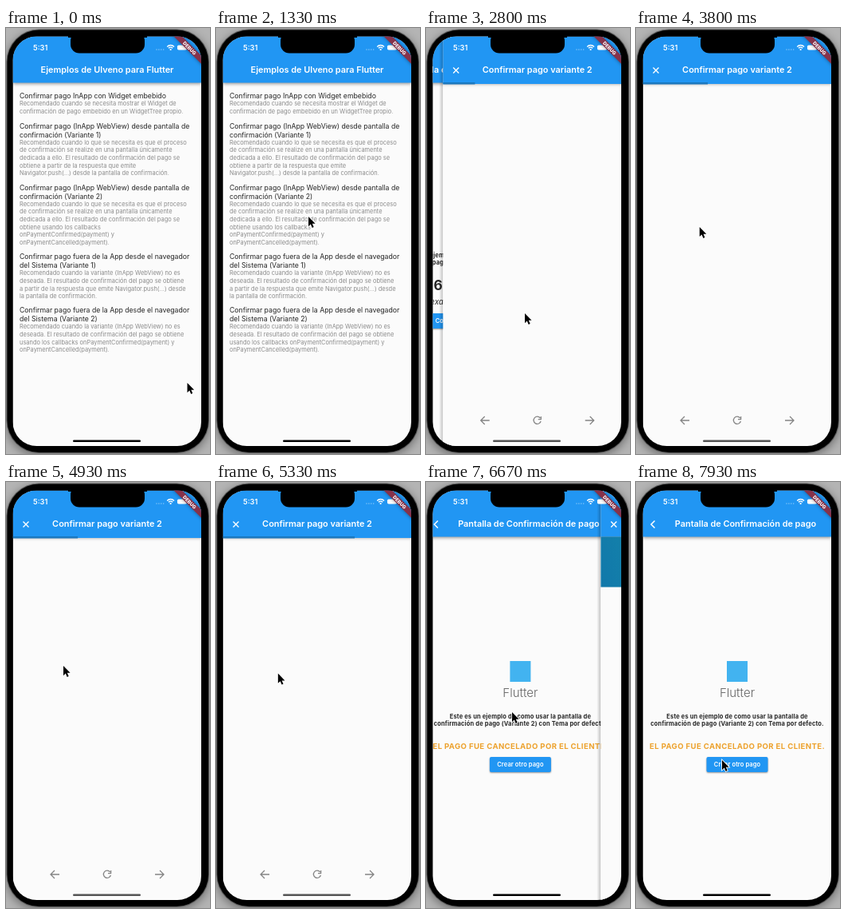
An HTML page with a canvas for the animation above (8 s loop, 256 by 533 pixels).

```html
<!DOCTYPE html>
<html lang="es">
<head>
<meta charset="utf-8">
<style>
html, body { margin: 0; width: 100%; height: 100%; overflow: hidden; background: #b4b4b4; }
canvas { display: block; width: 256px; height: 533px; }
</style>
</head>
<body>
<canvas id="stage"></canvas>
<script>
const LOOP = 8000, LEFT = 8.5, TOP = 10.5, WIDTH = 236.5, HEIGHT = 512.5, MID = 127, BAR_BOTTOM = 68.5;
const BLUE = '#2196f3', PAGE = '#fbfbfb', INK = '#262626', MUTED = '#8b8b8b';
const canvas = document.getElementById('stage');
const dpr = window.devicePixelRatio || 1;
canvas.width = 256 * dpr;
canvas.height = 533 * dpr;
const ctx = canvas.getContext('2d');

const clamp = v => Math.max(0, Math.min(1, v));
const smooth = v => v * v * (3 - 2 * v);

// Page slide: cubic-bezier(.35, .91, .33, .97)
function slideEase(x) {
  if (x <= 0 || x >= 1) return x;
  const curve = (s, a, b) => 3 * (1 - s) * (1 - s) * s * a + 3 * (1 - s) * s * s * b + s * s * s;
  let lo = 0, hi = 1;
  for (let i = 0; i < 20; i++) {
    const s = (lo + hi) / 2;
    if (curve(s, .35, .33) < x) lo = s; else hi = s;
  }
  return curve(lo, .91, .97);
}
const slide = (t, start) => slideEase(clamp((t - start) / 400));

function text(str, x, y, size, { color = INK, weight = 400, spacing = 0, align = 'left', style = 'normal' } = {}) {
  ctx.font = `${style} ${weight} ${size}px Inter, sans-serif`;
  ctx.letterSpacing = spacing + 'px';
  ctx.textAlign = align;
  ctx.fillStyle = color;
  ctx.fillText(str, x, y);
}

function box(x, y, w, h, color, radius = 0) {
  ctx.fillStyle = color;
  ctx.beginPath();
  ctx.roundRect(x, y, w, h, radius);
  ctx.fill();
}

function dot(x, y, r, color) {
  ctx.fillStyle = color;
  ctx.beginPath();
  ctx.arc(x, y, r, 0, 7);
  ctx.fill();
}

function line(path, color, width) {
  ctx.strokeStyle = color;
  ctx.lineWidth = width;
  ctx.stroke(new Path2D(path));
}

function withShadow(blur, dy, draw) {
  ctx.save();
  ctx.shadowColor = 'rgba(0,0,0,.4)';
  ctx.shadowBlur = blur * dpr;
  ctx.shadowOffsetY = dy * dpr;
  draw();
  ctx.restore();
}

function page(title, titleX = MID) {
  box(LEFT, TOP, WIDTH, HEIGHT, PAGE);
  withShadow(4, 1.4, () => box(LEFT, TOP, WIDTH, BAR_BOTTOM - TOP, BLUE));
  text(title, titleX, 56.4, 10.9, { color: '#fff', weight: 600, align: 'center' });
}

function raisedButton(label, y, w) {
  withShadow(2, 1, () => box(MID - w / 2, y, w, 19, BLUE, 2));
  text(label, MID, y + 12.2, 7.5, { color: '#fff', weight: 600, spacing: .1, align: 'center' });
}

const EXAMPLES = [
  [88, 'Confirmar pago InApp con Widget embebido',
    'Recomendado cuando se necesita mostrar el Widget de|confirmación de pago embebido en un WidgetTree propio.'],
  [125.5, 'Confirmar pago (InApp WebView) desde pantalla de|confirmación (Variante 1)',
    'Recomendado cuando lo que se necesita es que el proceso|de confirmación se realize en una pantalla únicamente|dedicada a ello. El resultado de confirmación del pago se|obtiene a partir de la respuesta que emite|Navigator.push(...) desde la pantalla de confirmación.'],
  [202.5, 'Confirmar pago (InApp WebView) desde pantalla de|confirmación (Variante 2)',
    'Recomendado cuando lo que se necesita es que el proceso|de confirmación se realize en una pantalla únicamente|dedicada a ello. El resultado de confirmación del pago se|obtiene usando los callbacks|onPaymentConfirmed(payment) y|onPaymentCancelled(payment).'],
  [289, 'Confirmar pago fuera de la App desde el navegador|del Sistema (Variante 1)',
    'Recomendado cuando la variante (InApp WebView) no es|deseada. El resultado de confirmación del pago se obtiene|a partir de la respuesta que emite Navigator.push(...) desde|la pantalla de confirmación.'],
  [356, 'Confirmar pago fuera de la App desde el navegador|del Sistema (Variante 2)',
    'Recomendado cuando la variante (InApp WebView) no es|deseada. El resultado de confirmación del pago se obtiene|usando los callbacks onPaymentConfirmed(payment) y|onPaymentCancelled(payment).']
];

function listPage() {
  page('Ejemplos de Ulveno para Flutter');
  for (const [top, title, body] of EXAMPLES) {
    const heads = title.split('|');
    heads.forEach((s, i) => text(s, 17, top + i * 11, 8.7));
    const y = top + (heads.length - 1) * 11 + 9.3;
    body.split('|').forEach((s, i) => text(s, 17, y + i * 9.6, 7.45, { color: MUTED }));
  }
}

function paymentPage(cancelled) {
  page('Pantalla de Confirmación de pago', 137.5);
  line('M23.5 48.5L19 53L23.5 57.5', '#fff', 1.5);
  const dy = cancelled ? 9 : 0;
  box(114, 215 + dy, 26, 26, '#42b3f0');
  text('Flutter', MID, 260 + dy, 15, { color: '#666', weight: 300, align: 'center' });
  const bold = { weight: 700, spacing: .16, align: 'center' };
  text('Este es un ejemplo de como usar la pantalla de', MID, 286.5 + dy, 7.5, bold);
  text('confirmación de pago (Variante 2) con Tema por defecto.', MID, 296 + dy, 7.5, bold);
  if (cancelled) {
    text('EL PAGO FUE CANCELADO POR EL CLIENTE.', MID, 333.5, 9.6, { ...bold, spacing: .37, color: '#eda22d' });
    raisedButton('Crear otro pago', 344, 77);
  } else {
    text('62.00', 84, 328, 17.4, { weight: 700, spacing: .3 });
    text('CUP', 142, 328, 13);
    text('This is an example payment description', 125, 346, 9.5, { align: 'center', style: 'italic', spacing: .16 });
    raisedButton('Confirmar pago ahora', 357, 99);
  }
}

function navIcons(color) {
  line('M67 491H56M61 486L56 491L61 496', color, 1.3);
  line('M187 491H198M193 486L198 491L193 496', color, 1.3);
  line('M130.6 488A4.6 4.6 0 1 0 131.4 492M131.6 486V489.6H128', color, 1.3);
}

function checkoutPage() {
  const sea = ctx.createLinearGradient(LEFT, 131, LEFT + WIDTH, 69);
  sea.addColorStop(0, '#1178aa');
  sea.addColorStop(.6, '#1994ab');
  sea.addColorStop(1, '#0c7fa9');
  box(LEFT, BAR_BOTTOM, WIDTH, 63, sea);
  text('ULVENO', MID + 1.5, 105, 14, { color: '#fff', weight: 300, spacing: 6.4, align: 'center' });
  dot(MID, 162, 20.5, '#7a706b');
  text('Test', MID, 203.5, 10.8, { align: 'center' });
  text('62.00', 93, 234, 15.4, { spacing: -.2 });
  text('CUP', 137, 234.5, 10.8);
  box(42, 250.5, 169.5, 26, '#007bff', 3);
  text('PAGAR', MID, 267.5, 10.2, { color: '#fff', align: 'center' });
  const link = { color: '#1b84db' };
  text('Cancelar y volver al comercio', 42, 292, 8.35, link);
  line('M42 307H211', '#e3e3e3', .8);
  dot(MID, 309, 2.8, '#ccc');
  dot(MID, 309, 2, PAGE);
  text('Ver detalles del pedido', MID, 330, 8.4, { ...link, align: 'center' });
}

function webPage(t) {
  page('Confirmar pago variante 2');
  line('M21.5 49.5L28.5 56.5M28.5 49.5L21.5 56.5', '#fff', 1.4);
  const loaded = t >= 5470;
  if (loaded) checkoutPage();
  else {
    const progress = t < 3200 ? .17 : t < 5130 ? .345 : .7;
    box(LEFT, 68, WIDTH, 2, BLUE);
    box(LEFT, 68, WIDTH * progress, 2.6, '#1a78bf');
  }
  navIcons(loaded ? '#1e88e5' : '#858585');
}

function shifted(dx, draw) {
  ctx.save();
  ctx.translate(dx, 0);
  draw();
  ctx.restore();
}

// Lays one page over another; cover runs from 0 (off right) to 1
function stack(below, above, cover) {
  if (cover < 1) shifted(-WIDTH * cover / 3, below);
  if (cover <= 0) return;
  shifted(WIDTH * (1 - cover), () => {
    if (cover < 1) {
      const edge = ctx.createLinearGradient(LEFT - 5, 0, LEFT, 0);
      edge.addColorStop(0, 'rgba(0,0,0,0)');
      edge.addColorStop(1, 'rgba(0,0,0,.22)');
      box(LEFT - 5, TOP, 5, HEIGHT, edge);
    }
    ctx.beginPath();
    ctx.rect(LEFT, TOP, WIDTH, HEIGHT);
    ctx.clip();
    above();
  });
}

function statusBar() {
  text('5:31', 34, 28, 9.2, { color: '#fff', weight: 600 });
  for (let i = 0; i < 4; i++) dot(189 + i * 2.9, 27, .7, 'rgba(255,255,255,.5)');
  line('M202.2 23.4A6.2 6.2 0 0 1 211 23.4M204 25.3A3.7 3.7 0 0 1 209.2 25.3', '#fff', 1.4);
  dot(206.6, 27, 1.1, '#fff');
  box(215, 21.5, 12, 6, '#fff', 1.8);
  box(227.6, 23.3, 1, 2.4, 'rgba(255,255,255,.7)', .5);
  ctx.save();
  ctx.translate(LEFT + WIDTH, TOP);
  ctx.rotate(Math.PI / 4);
  withShadow(4, 0, () => box(-30, 17, 60, 7.3, '#86324a'));
  text('DEBUG', 0, 22.9, 6, { color: '#fff', weight: 800, align: 'center' });
  ctx.restore();
}

// Each move: start, end, target x, target y
const MOVES = [
  [70, 730, 112, 226], [1200, 1330, 116, 236], [2000, 2400, 124, 357],
  [3400, 3930, 72, 230], [5130, 5930, 109, 291], [6480, 6600, 108, 288], [7000, 7800, 108, 348]
];

function cursor(t) {
  let x = 227.5, y = 444;
  for (const [start, end, toX, toY] of MOVES) {
    const k = smooth(clamp((t - start) / (end - start)));
    x += (toX - x) * k;
    y += (toY - y) * k;
  }
  const arrow = new Path2D('M0 0V12.2L2.8 9.6L4.7 14L6.7 13.1L4.8 8.8H8.6Z');
  ctx.save();
  ctx.translate(x, y);
  ctx.strokeStyle = '#fff';
  ctx.lineWidth = 1.6;
  ctx.stroke(arrow);
  ctx.fillStyle = '#000';
  ctx.fill(arrow);
  ctx.restore();
}

function render(t) {
  ctx.setTransform(dpr, 0, 0, dpr, 0, 0);
  box(0, 0, 256, 533, '#b4b4b4');
  withShadow(12, 3, () => box(.5, 1.5, 254.5, 530.5, '#5a5a5a', 41));
  box(1.5, 2.5, 252.5, 528.5, '#000', 40);

  ctx.save();
  ctx.beginPath();
  ctx.roundRect(LEFT, TOP, WIDTH, HEIGHT, 30);
  ctx.clip();
  if (t < 2575) stack(listPage, () => paymentPage(false), slide(t, 1600));
  else if (t < 6450) stack(() => paymentPage(false), () => webPage(t), slide(t, 2575));
  else stack(() => paymentPage(true), () => webPage(t), 1 - slide(t, 6491));
  statusBar();
  ctx.restore();

  box(81, 5, 93, 26.5, '#000', 11);
  box(78, 8, 99, 4, '#000');
  box(84, 515.6, 85, 2.5, t >= 2600 && t < 6500 ? '#555' : '#000', 1.25);
  cursor(t);
}

function tick() {
  render(performance.now() % LOOP);
  requestAnimationFrame(tick);
}
tick();
</script>
</body>
</html>
```
